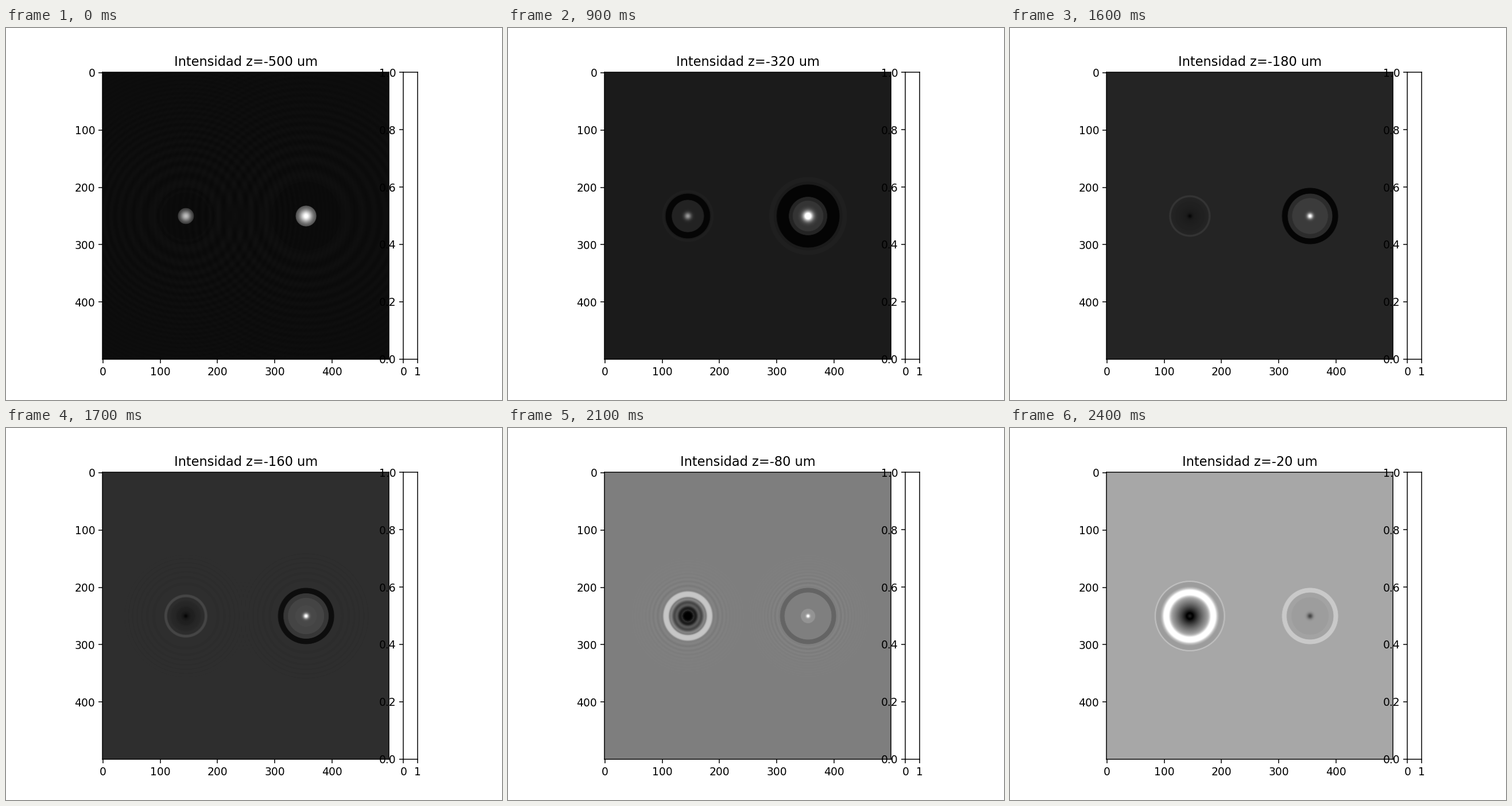
Recreate the animation shown at these times as a matplotlib script. Size 864 px wide and 648 px high, loop 2500 ms.

```python
import numpy as np
import matplotlib.pyplot as plt
from matplotlib.animation import FuncAnimation

W, H, DPI = 864, 648, 135
N, FRAMES = 500, 25
R = np.arange(0, 460, .25)
yy, xx = np.mgrid[:N, :N]
LEFT_DIST = np.hypot(xx - 145, yy - 250)
RIGHT_DIST = np.hypot(xx - 355, yy - 250)


def at(z, *points):
    """Value at depth z along straight lines through (depth, value) points."""
    return np.interp(z, *zip(*points))


def background(z):
    return np.exp(at(z, (-500, 2.56), (-380, 3.26), (-260, 3.35), (-180, 3.58),
                     (-100, 4.57), (-80, 4.84), (-20, 5.12)))


# Radial profiles are relative to the background, which is 1.
def ring(v, r0, r1, tone, soft=.3):
    mask = (np.tanh((R - r0) / soft) - np.tanh((R - r1) / soft)) / 2
    return v + (tone - v) * mask


def disc(v, r, tone):
    return ring(v, -9, r, tone)


def core(v, peak, size):
    return v + (peak - v) * np.exp(-(R / size) ** 2)


def fringes(z, start, period):
    """Fresnel fringes, spaced evenly in the squared radius."""
    height = at(z, (-500, .15), (-440, 0), (-180, 0), (-100, .05), (-20, 0))
    reach = at(z, (-500, 190), (-100, 25))
    wave = np.sin(2 * np.pi * (R ** 2 - start ** 2) / period)
    return height * wave * np.exp(-((R - start) / reach) ** 2) * (R > start)


def left_spot(z, back):
    inner = at(z, (-500, 14), (-380, 26), (-180, 33))
    outer = at(z, (-500, 50), (-380, 41.5), (-180, 33))
    v = disc(np.ones_like(R), inner, at(z, (-500, 3.5), (-380, 1.35), (-180, 1)))

    # The centre turns into a dark, rippled bowl
    dark = at(z, (-260, 0), (-180, .25), (-100, 1))
    ripple = at(z, (-180, 0), (-100, .2), (-20, 0))
    bowl = np.clip((R - 6) / 27, 0, 1) ** .8
    bowl += ripple * np.cos(2 * np.pi * (R - 19) / 10) * ((R > 9) & (R < 31))
    v *= 1 - dark * (1 - bowl)

    peak = at(z, (-500, 190), (-380, 175), (-260, 130), (-180, 5), (-80, 0), (-20, 32))
    v = core(v, peak / back, at(z, (-500, 9), (-380, 8), (-260, 4), (-20, 3)))
    v = ring(v, inner, outer, at(z, (-500, .85), (-380, .2)))

    mid = at(z, (-260, 43), (-180, 34.5), (-100, 37), (-20, 41))
    half = at(z, (-260, 2), (-180, 1.6), (-100, 4.5), (-20, 6))
    v = ring(v, mid - half, mid + half, at(z, (-380, 1), (-180, 1.5), (-20, 1.6)),
             at(z, (-100, .6), (-20, 2.5)))
    v = ring(v, 51, 59, at(z, (-80, 1), (-20, .93)), 1)
    v = ring(v, 59.5, 61.5, at(z, (-80, 1), (-20, 1.15)))
    return v + fringes(z, at(z, (-500, 50), (-100, 46)), 400 - 6 * z)


def right_spot(z, back):
    inner = at(z, (-500, 18), (-380, 31), (-180, 39), (-100, 41))
    outer = at(z, (-500, 64), (-380, 56), (-260, 54), (-180, 49))
    tone = at(z, (-500, 5.4), (-380, 1.6), (-260, 2.2), (-180, 1.65), (-100, 1.03), (-20, .94))
    v = disc(np.ones_like(R), inner, 1 + .4 * (tone - 1))
    v = disc(v, .8 * inner, tone)
    v = disc(v, at(z, (-180, 20), (-20, 8)), tone * at(z, (-180, 1), (-100, 1.2), (-20, 1)))

    peak = at(z, (-500, 262), (-380, 330), (-260, 340), (-180, 265), (-80, 285), (-20, 70))
    v = core(v, peak / back, at(z, (-500, 11), (-380, 10), (-180, 5), (-80, 3), (-20, 5)))
    v = ring(v, inner, outer, at(z, (-500, .85), (-380, .2), (-180, .14), (-100, .72),
                                 (-80, .79), (-20, 1.2)))
    v = ring(v, 60, 68, at(z, (-380, 1), (-260, 1.3), (-180, 1)))
    v = ring(v, 68, 69.5, at(z, (-440, 1), (-380, 1.6), (-320, 1)))
    return v + fringes(z, at(z, (-500, 64), (-100, 52)), 100 - 9 * z)


def intensity(z):
    back = background(z)
    left = np.interp(LEFT_DIST, R, left_spot(z, back))
    right = np.interp(RIGHT_DIST, R, right_spot(z, back))
    return np.clip(back * (left + right - 1), 0, 255)


fig = plt.figure(figsize=(W / DPI, H / DPI), dpi=DPI, facecolor="white")
side = .77 * H
x0 = .5125 * W - .55 * side
bottom, tall = .1101, .7706
ax = fig.add_axes([x0 / W, bottom, side / W, tall])
cax = fig.add_axes([(x0 + 1.05 * side) / W, bottom, .05 * side / W, tall])

img = ax.imshow(intensity(-500), cmap="gray", vmin=0, vmax=255, aspect="auto")
ax.set_xticks(range(0, N, 100))
ax.set_yticks(range(0, N, 100))
cax.set_xticks([0, 1])
title = ax.set_title("")


def update(i):
    z = 20 * i - 500
    img.set_data(intensity(z))
    title.set_text(f"Intensidad z={z} um")
    return img, title


anim = FuncAnimation(fig, update, frames=FRAMES, interval=100,
                     repeat=True, repeat_delay=0, blit=False)
plt.show()
```
